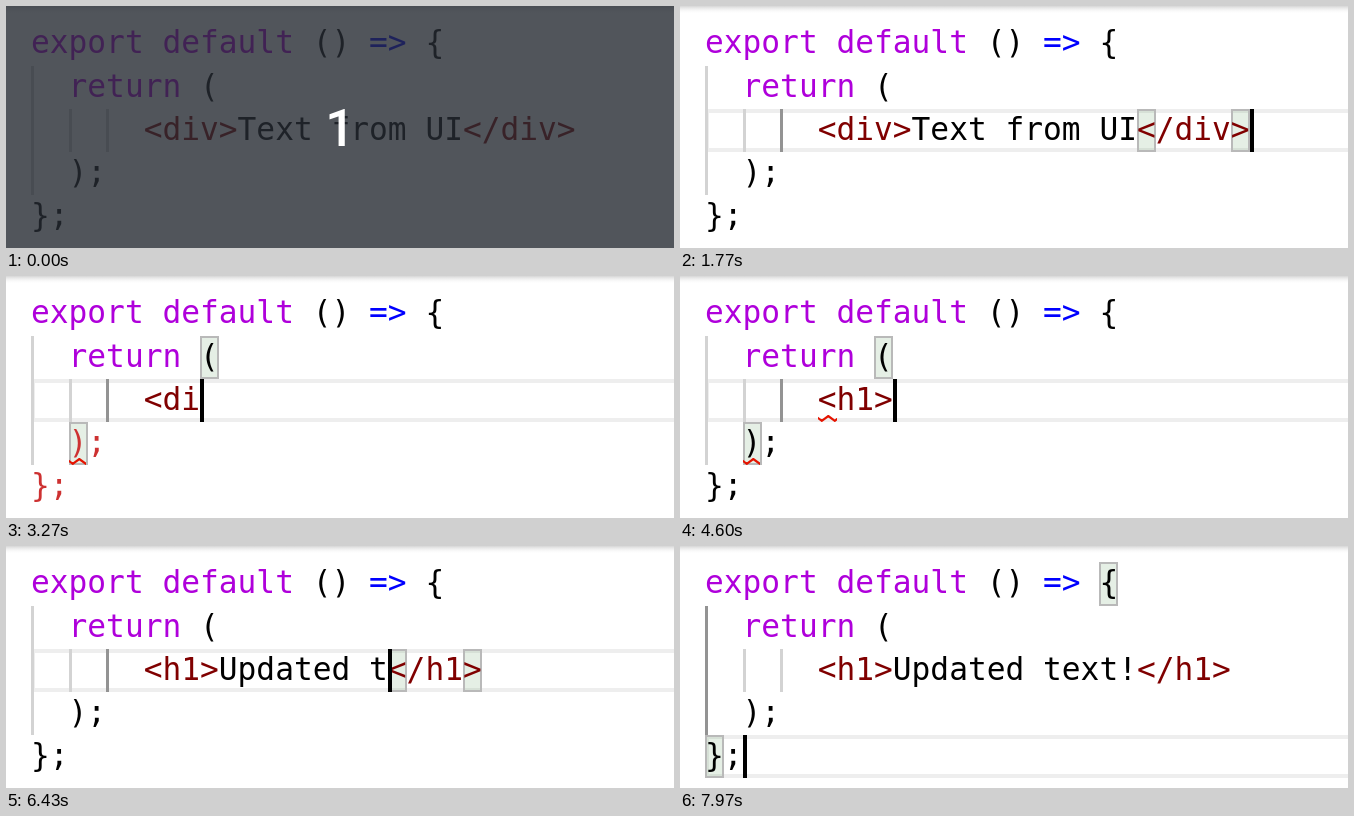
Write an HTML page with a canvas that moves like this. It is 668 px wide and 242 px high and loops after 8 s.

```html
<!DOCTYPE html>
<html lang="en">
<meta charset="utf-8">
<title>Live code editing</title>
<style>
  html, body { margin: 0; overflow: hidden; background: #fff; }
  canvas { display: block; }
</style>
<canvas id="stage" width="668" height="242"></canvas>
<script>
const ctx = document.getElementById('stage').getContext('2d');
const LOOP = 8000, W = 668, H = 242;
const LEFT = 25, COL = 18.78, TOP = 16.4, ROW = 43.2, INDENT = 6;
const COLORS = { keyword: '#af00db', arrow: '#0000ff', tag: '#800000', plain: '#000', invalid: '#cd3131' };

const colX = col => Math.round(LEFT + col * COL);
const rowY = row => Math.round(TOP + row * ROW);
// Value of the last [time, value] pair that has started.
const latest = (steps, t) => steps.filter(([start]) => start <= t).pop()[1];

const OLD_LINE = '<div>Text from UI</div>';
const RETYPING = [[3400, '<d'], [3530, '<'], [3900, ''], [4030, '<'], [4200, '<h'], [4300, '<h1'], [4600, '<h1>']];
const NEW_TEXT = 'Updated text!';
const KEY_TIMES = [5070, 5430, 5500, 5600, 5670, 5730, 5900, 6000, 6430, 6500, 6670, 6730, 7100];
const CURSOR_ROWS = [[0, 6], [1130, 5], [1270, 4], [1400, 3], [1500, 2], [7800, 3], [7970, 4]];
const BRACKETS = [[0, ''], [1330, '{}'], [1430, '()'], [1770, '<>'], [2070, ''], [2810, '()'], [4700, '<>'], [7870, '{}']];
const BRACKET_CELLS = { '{}': [[0, 21], [4, 0]], '()': [[1, 9], [3, 2]] };

// The edited line, split at the cursor.
function editedLine(t) {
  if (t < 2030) return [OLD_LINE, ''];
  if (t < 3400) {
    const repeats = t < 2530 ? 0 : 1 + Math.min(18, Math.floor((t - 2530) * 18 / 740));
    return [OLD_LINE.slice(0, -1 - repeats), ''];
  }
  if (t < 4670) return [latest(RETYPING, t), ''];
  const typed = KEY_TIMES.filter(time => time <= t).length;
  return ['<h1>' + NEW_TEXT.slice(0, typed), '</h1>'];
}

function cursorCol(t, row, before) {
  if (row === 2) return t < 1730 ? 0 : INDENT + before.length;
  return t < 1730 ? 0 : row === 3 ? 4 : 2;
}

function fill(color, x, y, w, h) {
  ctx.fillStyle = color;
  ctx.fillRect(x, y, w, h);
}

function write(row, col, text, color) {
  ctx.fillStyle = COLORS[color];
  [...text].forEach((char, i) =>
    ctx.fillText(char, LEFT + (col + i) * COL, rowY(row) + 31));
}

function drawCurrentLine(row) {
  ctx.strokeStyle = '#eee';
  ctx.lineWidth = 4;
  ctx.strokeRect(LEFT + 2, rowY(row) + 2, W, 39);
}

function drawGuides(cursorRow) {
  const active = { 2: 4, 3: 2, 4: 0 }[cursorRow];
  for (const [col, first, last] of [[0, 1, 4], [2, 2, 3], [4, 2, 3]]) {
    const y = rowY(first);
    fill(col === active ? '#939393' : '#d3d3d3', colX(col), y, 3, rowY(last) - y);
  }
}

function drawBracket([row, col]) {
  const x = colX(col), y = rowY(row), h = rowY(row + 1) - y;
  fill('rgba(0,100,0,.1)', x, y, 19, h);
  ctx.strokeStyle = '#b9b9b9';
  ctx.lineWidth = 2;
  ctx.strokeRect(x + 1, y + 1, 17, h - 2);
}

function drawSquiggle(row, col, width) {
  const x = colX(col), y = rowY(row + 1) - 7;
  ctx.save();
  ctx.beginPath();
  ctx.rect(x, y, width, 7);
  ctx.clip();
  ctx.beginPath();
  for (let i = -1; i < 4; i++) ctx.lineTo(x + 3.8 + i * 6.5, y + (i % 2 ? 1 : 5.8));
  ctx.strokeStyle = '#e51400';
  ctx.lineWidth = 2.2;
  ctx.stroke();
  ctx.restore();
}

function drawCode(line) {
  const rest = /^<\w+$/.test(line) ? 'invalid' : 'plain';
  ctx.font = '31.2px "DejaVu Sans Mono", monospace';
  ctx.textAlign = 'left';
  write(0, 0, 'export default', 'keyword');
  write(0, 15, '()', 'plain');
  write(0, 18, '=>', 'arrow');
  write(0, 21, '{', 'plain');
  write(1, 2, 'return', 'keyword');
  write(1, 9, '(', 'plain');
  for (const part of line.matchAll(/<[^>\s]*>?|[^<]+/g))
    write(2, INDENT + part.index, part[0], part[0][0] === '<' ? 'tag' : 'plain');
  write(3, 2, ');', rest);
  write(4, 0, '};', rest);
}

function drawTopShadow() {
  const shade = ctx.createLinearGradient(0, 0, 0, 8);
  shade.addColorStop(0, '#d6d6d6');
  shade.addColorStop(1, 'rgba(255,255,255,0)');
  fill(shade, 0, 0, W, 8);
}

function drawCountdown() {
  fill('rgba(38,43,50,.8)', 0, 0, W, H);
  ctx.font = '500 52px Roboto, sans-serif';
  ctx.textAlign = 'center';
  ctx.fillStyle = '#fff';
  ctx.fillText('1', W / 2, 140);
}

function draw(t) {
  const [before, after] = editedLine(t);
  const line = before + after;
  const row = latest(CURSOR_ROWS, t);
  const pair = latest(BRACKETS, t);

  fill('#fff', 0, 0, W, H);
  drawCurrentLine(row);
  drawGuides(row);
  if (pair === '<>') {
    drawBracket([2, INDENT + line.lastIndexOf('<')]);
    if (line.endsWith('>')) drawBracket([2, INDENT + line.length - 1]);
  } else if (pair) {
    BRACKET_CELLS[pair].forEach(drawBracket);
  }
  drawCode(line);
  if (t >= 2370 && t < 5200) drawSquiggle(3, 2, 17);
  if (t >= 4370 && t < 4770) drawSquiggle(2, INDENT, 19);
  const blinkedOff = t >= 7600 && t < 7800;
  if (!blinkedOff) fill('#000', colX(cursorCol(t, row, before)), rowY(row), 4, 43);
  drawTopShadow();
  if (t < 30) drawCountdown();
}

const start = performance.now();
function tick() {
  draw((performance.now() - start) % LOOP);
  requestAnimationFrame(tick);
}
tick();
</script>
</html>
```
